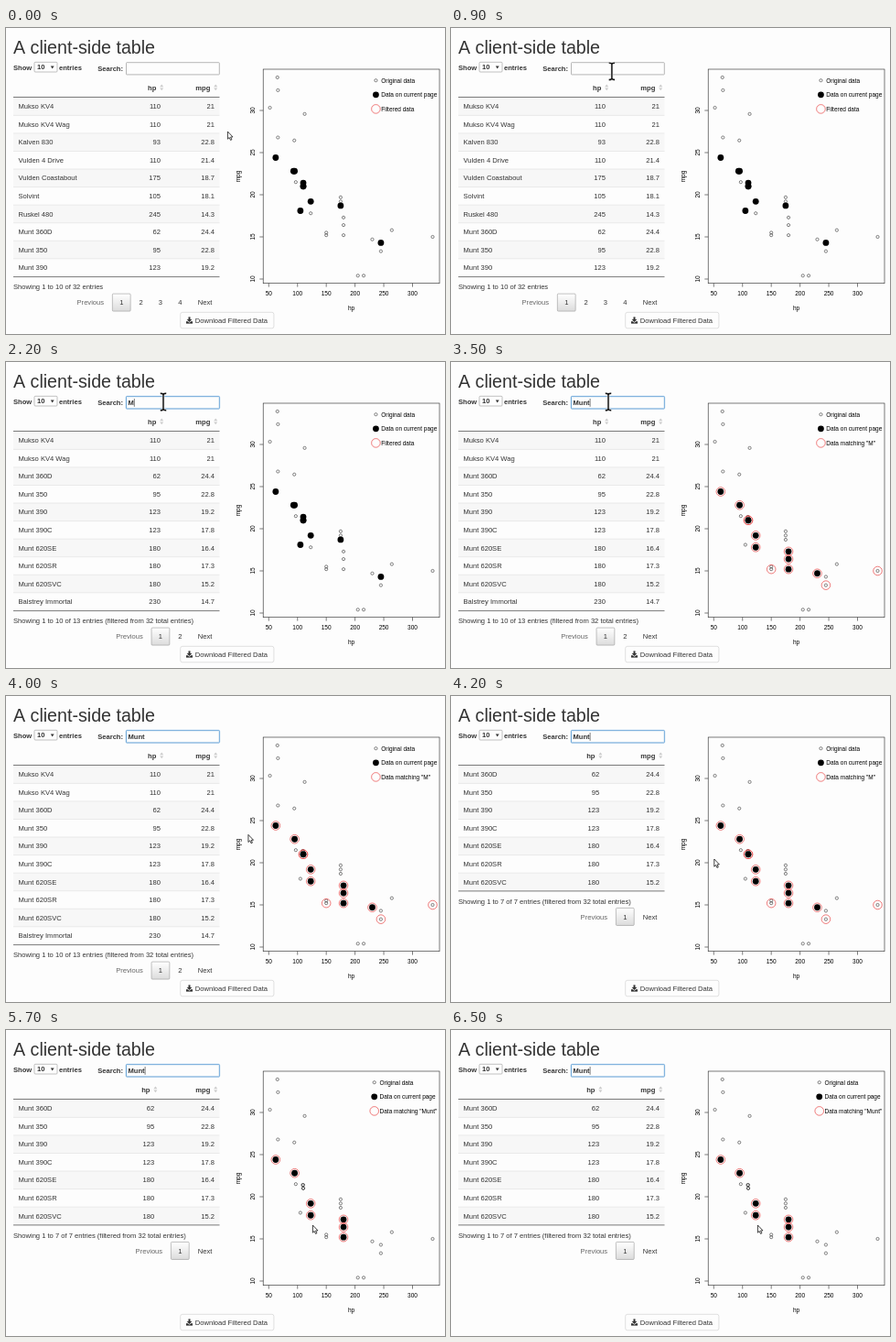
Animation, 480 px wide and 334 px high, one loop 6.6 s. Source, as an HTML page with a canvas:

```html
<!DOCTYPE html>
<html lang="en">
<head>
<meta charset="utf-8">
<title>A client-side table</title>
<style>
html, body { margin: 0; width: 100%; height: 100%; overflow: hidden; background: #fdfdfd; }
canvas { display: block; width: 480px; height: 334px; }
</style>
</head>
<body>
<canvas id="stage"></canvas>
<script>
const W = 480, H = 334, LOOP = 6600, STEP = 100;
const canvas = document.getElementById('stage');
const ctx = canvas.getContext('2d');
const dpr = window.devicePixelRatio || 1;
canvas.width = W * dpr;
canvas.height = H * dpr;

const FONT = '"Liberation Sans", Arial, sans-serif';
const BODY = 7.58, SMALL = 6.5, HAIR = 0.6;
const PAPER = '#fdfdfd', INK = '#333', LINE = '#222';

const car = (name, hp, mpg) => ({ name, hp, mpg });
const twins = (hp, mpg, dHp, dMpg) => [car('', hp, mpg), car('', hp + dHp, mpg + dMpg)];

// light cars lie on an oval in the upper left of the plot
const lightCars = Array.from({ length: 5 }, (_, i) => {
  const a = (125 + 56 * i) * Math.PI / 180;
  return car('', 82.5 + 30.5 * Math.cos(a), 30.4 + 4.3 * Math.sin(a));
});

const cars = [
  car('Mukso KV4', 110, 21),
  car('Mukso KV4 Wag', 110, 21),
  car('Kalven 830', 93, 22.8),
  car('Vulden 4 Drive', 110, 21.4),
  car('Vulden Coastabout', 175, 18.7),
  car('Solvint', 105, 18.1),
  car('Ruskel 480', 245, 14.3),
  car('Munt 360D', 62, 24.4),
  car('Munt 350', 95, 22.8),
  car('Munt 390', 123, 19.2),
  car('Munt 390C', 123, 17.8),
  car('Munt 620SE', 180, 16.4),
  car('Munt 620SR', 180, 17.3),
  car('Munt 620SVC', 180, 15.2),
  car('Balstrey Immortal', 230, 14.7),
  car('Trelmo', 150, 15.2),
  car('Dramik', 245, 13.3),
  car('Molgate', 335, 15),
  car('', 150, 15.5),
  car('', 66, 32.4),
  car('', 264, 15.8),
  ...twins(175, 19.2, 0, 0.5),
  ...twins(205, 10.4, 10, 0),
  ...twins(97, 21.5, 12, -0.1),
  ...lightCars
];

const QUERY = 'Munt', PAGE = 10;
const FOCUS = 1300, FIRST_KEY = 2000, NEXT_KEYS = 3000;
const PLOT_LAG = 400, BLINK = 560, BLINK_START = 4200;

const queryAt = t => t < 2200 ? '' : t < 4200 ? QUERY[0] : QUERY;
const search = query => cars.filter(c => c.name.toLowerCase().includes(query.toLowerCase()));

function typedAt(t) {
  if (t < FIRST_KEY) return '';
  return QUERY.slice(0, 1 + Math.max(0, Math.floor((t - NEXT_KEYS) / STEP) + 1));
}

function text(str, x, y, { size = BODY, bold = false, align = 'left', color = INK } = {}) {
  ctx.font = `${bold ? 'bold ' : ''}${size}px ${FONT}`;
  ctx.textAlign = align;
  ctx.fillStyle = color;
  ctx.fillText(str, x, y);
}

function line(x1, y1, x2, y2, color, width = HAIR) {
  ctx.beginPath();
  ctx.moveTo(x1, y1);
  ctx.lineTo(x2, y2);
  ctx.strokeStyle = color;
  ctx.lineWidth = width;
  ctx.stroke();
}

function box(x, y, w, h, r, fill, stroke, width = HAIR) {
  ctx.beginPath();
  ctx.roundRect(x, y, w, h, r);
  ctx.fillStyle = fill;
  ctx.fill();
  ctx.strokeStyle = stroke;
  ctx.lineWidth = width;
  ctx.stroke();
}

// triangle pointing down for positive h, up for negative h
function triangle(x, y, half, h, color) {
  ctx.beginPath();
  ctx.moveTo(x - half, y);
  ctx.lineTo(x + half, y);
  ctx.lineTo(x, y + h);
  ctx.fillStyle = color;
  ctx.fill();
}

function circle(x, y, { r, fill, stroke, width }) {
  ctx.beginPath();
  ctx.arc(x, y, r, 0, Math.PI * 2);
  if (fill) { ctx.fillStyle = fill; ctx.fill(); }
  if (stroke) { ctx.strokeStyle = stroke; ctx.lineWidth = width; ctx.stroke(); }
}

function drawControls(t) {
  text('A client-side table', 8, 28, { size: 19.65 });
  text('Show', 8, 45.5, { bold: true });
  box(31, 37.3, 25, 10.7, 1, PAPER, '#999');
  text('10', 34, 45.4, { bold: true });
  triangle(50.7, 41.6, 1.9, 3, INK);
  text('entries', 58, 45.5, { bold: true });
  text('Search:', 128, 46.8, { bold: true, align: 'right' });

  const focused = t >= FOCUS;
  if (focused) box(131.5, 37.7, 101.8, 13.2, 0.8, PAPER, '#c4dcf1', 1.8);
  box(131.5, 37.7, 101.8, 13.2, 0.6, PAPER, focused ? '#5598d2' : '#a5a5a5', 0.8);
  const typed = typedAt(t);
  text(typed, 133.5, 47, { bold: true });
  if (focused && Math.floor((t - BLINK_START) / BLINK) % 2 === 0) {
    const x = 134 + ctx.measureText(typed).width;
    line(x, 40, x, 48.8, LINE);
  }
}

function header(label, right) {
  text(label, right - 4.7, 67.8, { bold: true, align: 'right' });
  triangle(right + 1.2, 64.2, 2, -2.6, '#ccc');
  triangle(right + 1.2, 65.6, 2, 2.6, '#ccc');
}

function drawTable(query) {
  const found = search(query), rows = found.slice(0, PAGE);
  const pages = Math.ceil(found.length / PAGE);
  const left = 8, right = 233.5, top = 75.8, pitch = 19.56;
  const mpgRight = 228, hpRight = pages > 1 ? 169 : 162.2;
  header('hp', hpRight);
  header('mpg', mpgRight);

  rows.forEach(({ name, hp, mpg }, i) => {
    const y = top + i * pitch, base = y + 12.4;
    if (i % 2 === 0) {
      ctx.fillStyle = '#f7f7f7';
      ctx.fillRect(left, y, right - left, pitch);
    }
    if (i) line(left, y, right, y, '#ddd');
    text(name, 13.5, base);
    text(hp, hpRight, base, { align: 'right' });
    text(mpg, mpgRight, base, { align: 'right' });
  });
  const bottom = top + rows.length * pitch;
  line(left, top - 0.3, right, top - 0.3, LINE);
  line(left, bottom + 0.2, right, bottom + 0.2, LINE);

  const total = query ? ` (filtered from ${cars.length} total entries)` : '';
  text(`Showing 1 to ${rows.length} of ${found.length} entries${total}`, left, bottom + 13.8);
  drawPager(pages, bottom + 18.7);
}

function drawPager(pages, y) {
  const gap = 21.35, base = y + 12.3, first = 190.3 - (pages - 1) * gap;
  const shade = ctx.createLinearGradient(0, y, 0, y + 19);
  shade.addColorStop(0, '#fff');
  shade.addColorStop(1, '#dcdcdc');
  box(first - 9.9, y, 19.8, 19, 1, shade, '#979797');
  text('Previous', first - 19.2, base, { align: 'right', color: '#666' });
  for (let i = 0; i < pages; i++) {
    text(i + 1, first + i * gap, base, { align: 'center' });
  }
  text('Next', 209.7, base);
}

function drawButton() {
  box(190.7, 310.3, 102.2, 17.5, 2.2, PAPER, '#ccc');
  ctx.fillStyle = INK;
  ctx.fillRect(197, 320.2, 7, 2.4);
  triangle(200.5, 318.6, 3.6, 3.2, PAPER);
  triangle(200.5, 318, 2.8, 2.9, INK);
  ctx.fillRect(199.5, 315.4, 2, 3);
  text('Download Filtered Data', 206.8, 321.6);
}

const plotText = { size: SMALL, align: 'center', color: '#000' };

function sideText(str, x, y) {
  ctx.save();
  ctx.translate(x, y);
  ctx.rotate(-Math.PI / 2);
  text(str, 0, 0, plotText);
  ctx.restore();
}

const open = { r: 1.6, stroke: LINE, width: 0.55 };
const solid = { r: 3.4, fill: '#000' };
const ring = { r: 4.8, stroke: '#ea5050', width: 0.75 };
const px = hp => 287.3 + (hp - 50) * 0.6288;
const py = mpg => 274 - (mpg - 10) * 9.2;

function drawLegend(query) {
  const entries = [
    ['Original data', open],
    ['Data on current page', solid],
    [query ? `Data matching "${query}"` : 'Filtered data', ring]
  ];
  ctx.font = `${SMALL}px ${FONT}`;
  const x = 471.3 - Math.max(...entries.map(([str]) => ctx.measureText(str).width));
  entries.forEach(([str, mark], i) => {
    const y = 57.2 + i * 15.6;
    circle(x - 5.8, y, mark);
    text(str, x, y + 2.4, { size: SMALL, color: '#000' });
  });
}

function drawPlot(query) {
  ctx.strokeStyle = LINE;
  ctx.lineWidth = HAIR;
  ctx.strokeRect(281.2, 45, 192.8, 233.7);
  for (let hp = 50; hp <= 300; hp += 50) {
    line(px(hp), 278.7, px(hp), 282.6, LINE);
    text(hp, px(hp), 292.3, plotText);
  }
  for (let mpg = 10; mpg <= 30; mpg += 5) {
    line(277.3, py(mpg), 281.2, py(mpg), LINE);
    sideText(mpg, 271.6, py(mpg));
  }
  text('hp', 377.5, 308, plotText);
  sideText('mpg', 256, 162);

  const found = search(query);
  const mark = (list, style) => list.forEach(c => circle(px(c.hp), py(c.mpg), style));
  mark(cars, open);
  mark(found.slice(0, PAGE), solid);
  if (query) mark(found, ring);
  drawLegend(query);
}

const stops = [
  { t: 300, x: 242, y: 113 },
  { t: 1000, x: 172, y: 43.5 },
  { t: 3500, x: 172, y: 43.5 },
  { t: 4200, x: 287.4, y: 178 },
  { t: 4700, x: 335, y: 213 }
];

function pointerAt(t) {
  const next = stops.findIndex(s => s.t > t);
  if (next === 0) return stops[0];
  if (next < 0) return stops[stops.length - 1];
  const a = stops[next - 1], b = stops[next];
  const u = (t - a.t) / (b.t - a.t), e = u * u * (3 - 2 * u);
  return { x: a.x + (b.x - a.x) * e, y: a.y + (b.y - a.y) * e };
}

function textCursor() {
  ctx.beginPath();
  for (const end of [-1, 1]) {
    ctx.moveTo(-3.2, 9.2 * end);
    ctx.quadraticCurveTo(0, 9.2 * end, 0, 7.5 * end);
    ctx.quadraticCurveTo(0, 9.2 * end, 3.2, 9.2 * end);
  }
  ctx.moveTo(0, -7.5);
  ctx.lineTo(0, 7.5);
  for (const [color, width] of [['#ddd', 2.6], ['#111', 1.4]]) {
    ctx.strokeStyle = color;
    ctx.lineWidth = width;
    ctx.stroke();
  }
}

const arrow = new Path2D('M.4 0V8.2L2.2 6.5 3.5 9.4 4.9 8.8 3.6 6 6 5.9Z');

function arrowCursor() {
  ctx.fillStyle = '#fff';
  ctx.fill(arrow);
  ctx.strokeStyle = '#111';
  ctx.lineWidth = 0.8;
  ctx.stroke(arrow);
}

function drawPointer(t) {
  const { x, y } = pointerAt(t);
  const overInput = x > 131 && x < 233 && y > 37 && y < 51;
  ctx.save();
  ctx.translate(x, y);
  overInput ? textCursor() : arrowCursor();
  ctx.restore();
}

function draw(t) {
  ctx.setTransform(dpr, 0, 0, dpr, 0, 0);
  ctx.fillStyle = PAPER;
  ctx.fillRect(0, 0, W, H);
  drawControls(t);
  drawTable(queryAt(t));
  drawButton();
  drawPlot(queryAt(t - PLOT_LAG));
  drawPointer(t);
}

const start = performance.now();
function tick() {
  const t = (performance.now() - start) % LOOP;
  draw(Math.floor(t / STEP) * STEP);
  requestAnimationFrame(tick);
}
tick();
</script>
</body>
</html>
```
